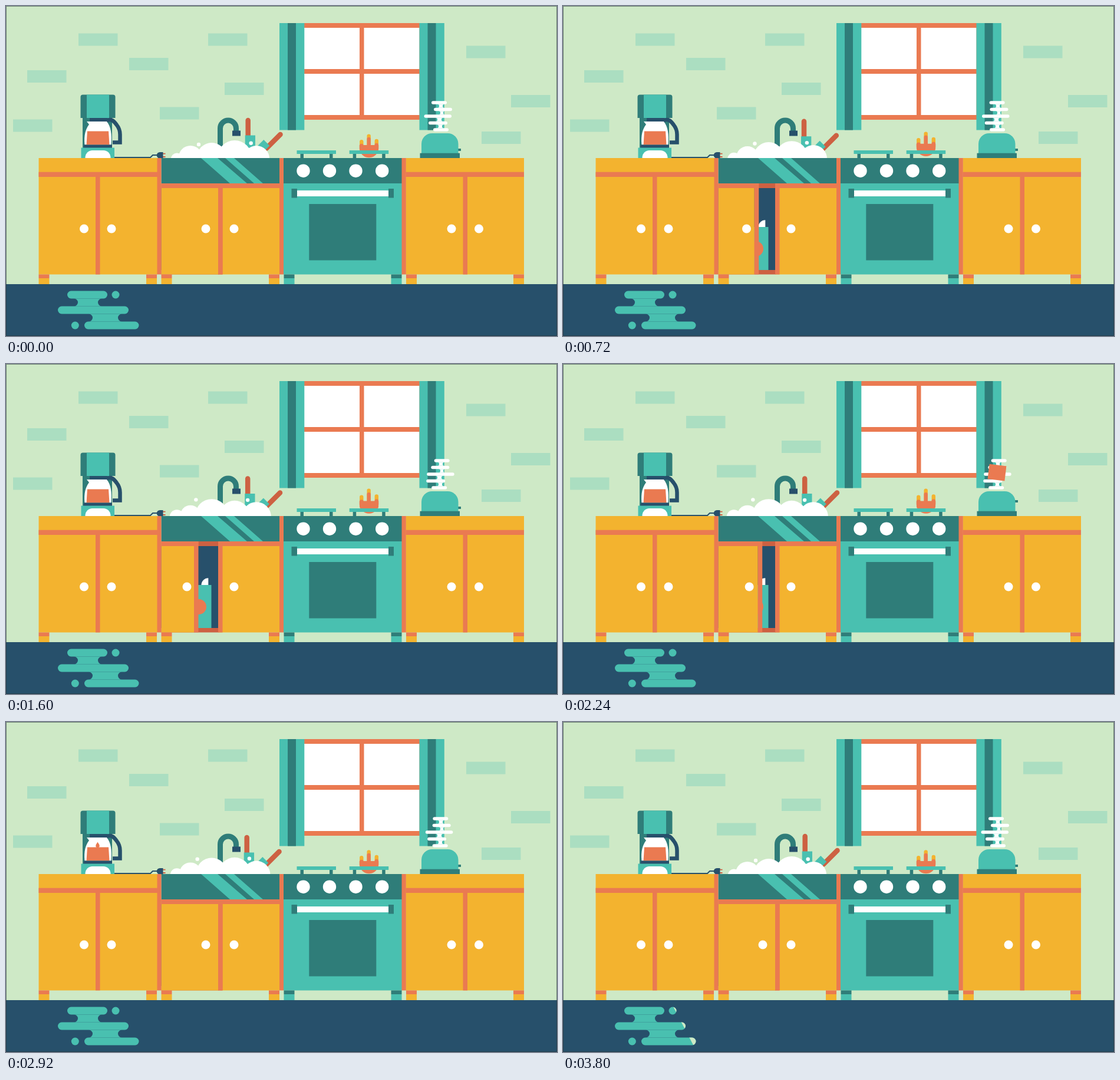
Recreate the animation shown at these times as an HTML page. Size 935 by 560 pixels, loop 3.84 s.

```html
<!DOCTYPE html>
<html lang="en">
<head>
<meta charset="utf-8">
<title>Kitchen</title>
<style>
  html, body { margin: 0; width: 100%; height: 100%; overflow: hidden; background: #cee9c6; }
  svg { display: block; width: 935px; height: 560px; }
</style>
</head>
<body>
<svg id="stage" viewBox="0 0 935 560" xmlns="http://www.w3.org/2000/svg"></svg>
<script>
const LOOP = 3840, STEP = 40;
const WALL = '#cee9c6', BRICK = '#abdec1', TEAL = '#49c0b0', DEEP = '#2f7d79', NAVY = '#27506b',
      ORANGE = '#ea7a51', RUST = '#cd6142', YELLOW = '#f3b32f', WHITE = '#fff';

// Shape helpers; rect takes left, top, right, bottom.
const rect = (x1, y1, x2, y2, fill, more = '') =>
  `<rect x="${x1}" y="${y1}" width="${x2 - x1}" height="${y2 - y1}" fill="${fill}" ${more}/>`;
const circle = (x, y, r, fill = WHITE, more = '') => `<circle cx="${x}" cy="${y}" r="${r}" fill="${fill}" ${more}/>`;
const path = (d, fill, more = '') => `<path d="${d}" fill="${fill}" ${more}/>`;
const line = (d, stroke, width, more = '') =>
  `<path d="${d}" fill="none" stroke="${stroke}" stroke-width="${width}" ${more}/>`;
const round = 'stroke-linecap="round"';
const pill = (x1, x2, y, r, fill, more = '') => rect(x1, y - r, x2, y + r, fill, `rx="${r}" ${more}`);
// Bridge between two pills with hollow round sides.
const bridge = (x1, x2, y, r) =>
  `M${x1} ${y - r}A${r} ${r} 0 0 1 ${x1} ${y + r}H${x2}A${r} ${r} 0 0 1 ${x2} ${y - r}Z`;

const bricks = [[123, 46.5], [209, 88], [36, 109], [343, 46.5], [371, 130], [261, 171.5],
                [12, 192.5], [781, 67.5], [857, 151], [807, 213]];
const steamRows = [[722, 748, 164, 5], [726, 757, 175.5, -5], [709.5, 756, 187, 5],
                   [717, 749, 198.5, -4], [725, 751, 210, -3]];
// x, y, radius, change of radius
const foamBumps = [[290, 259.5, 10, 2.5], [313, 257, 20, -3], [349, 257, 25, 3],
                   [388, 257, 29, -4], [425, 259, 22, 3]];
// x, tip, rise, inner tip
const tongues = [[603.3, 230.2, 6, 237], [615.7, 220.6, 8, 226], [628.8, 229, 6, 236]];

const windowFrame = () =>
  rect(506, 29, 702, 193, ORANGE) +
  [[506, 600], [607.5, 701.5]].map(([a, b]) => rect(a, 37, b, 107, WHITE) + rect(a, 115, b, 185, WHITE)).join('') +
  [464, 701.5].map(x => rect(x, 29, x + 42.3, 210.5, TEAL) + rect(x + 14, 29, x + 28, 210.5, DEEP)).join('');

const coffeeMaker = () =>
  rect(130, 188, 180, 241, DEEP) +
  path('M126.5 190V154.500a4 4 0 0 1 4-4H181.500a4 4 0 0 1 4 4V190Z', DEEP) +
  rect(137, 150.500, 175, 190, TEAL) +
  line('M170 195C178 190 183 195 188 202Q193.500 209 193.500 218V231.500H181', NAVY, 6.5) +
  path('M137 196H171C178 205 180 217 178.500 235.500H133.500C132 219 135 209 141 201Z', WHITE) +
  path('M138 212.500H174L175.500 235.500H136.500Z', ORANGE) +
  path('M0 -5.500C1 -3 3.200 -1.500 3.200 1A3.200 3.200 0 0 1 -3.200 1C-3.200 -1.500 -1 -3 0 -5.500Z', ORANGE, 'id="drop"') +
  rect(142, 190, 172, 196, NAVY) +
  rect(132, 235.500, 180, 241, NAVY) +
  rect(127.500, 240.500, 184, 259, TEAL) +
  path('M134.500 259V257A12 12 0 0 1 146.500 245H165.500A12 12 0 0 1 177.500 257V259Z', WHITE) +
  line('M184 257H245L249 253H258', NAVY, 2) +
  line('M265 250.700H270.500M265 256H270.500', RUST, 1.8) +
  path('M266.500 248V258.500H261A5 5 0 0 1 261 248Z', NAVY);

const sinkTop = () =>
  line('M363.500 258V207.500A13.500 13.500 0 0 1 390.500 207.500V213', DEEP, 9) +
  rect(384, 211.500, 398, 220.500, NAVY) +
  `<g id="tools">${
    line('M410.700 194V224', RUST, 8.5, round) + rect(405.700, 219.500, 423, 245, TEAL) +
    line('M465.500 218L442 241.500', RUST, 8.5, round) + line('M442.300 232L428 246.300', TEAL, 14)
  }</g>` +
  foamBumps.map(([x, y, r]) => circle(x, y, r, WHITE, 'class="bump"')).join('') +
  circle(327, 235, 3.2, WHITE, 'id="bubbleA"') + circle(415.700, 232.700, 3.2, WHITE, 'id="bubbleB"');

const burner = x =>
  rect(x, 245, x + 66.5, 251, TEAL) + rect(x + 6, 251, x + 11.5, 258.500, DEEP) + rect(x + 55.5, 251, x + 61, 258.500, DEEP);

const flame = () =>
  tongues.map(([x]) => line(`M${x} 240V240`, YELLOW, 6.4, `${round} class="tip"`)).join('') +
  tongues.map(([x]) => line(`M${x} 240V240`, ORANGE, 6.4, `${round} class="core"`)).join('') +
  path('M599.700 236H632.300V241A16.300 16.300 0 0 1 599.700 241Z', ORANGE, 'id="bowl"');

const toaster = () =>
  `<g>${steamRows.map(([a, b, y]) => pill(a, b, y, 2.75, WHITE, 'class="steam"')).join('')}${
    steamRows.slice(1).map(([, , y], i) => path(bridge([732, 734, 729, 731][i], [744, 745, 742, 743][i], y - 5.75, 3.1), WHITE)).join('')
  }</g>` +
  rect(-14.5, -12.7, 14.5, 12.7, ORANGE, 'id="toast"') +
  rect(765, 242, 772, 246, DEEP, 'id="lever"') +
  path('M705 251V234A18 18 0 0 1 723 216H749.500A18 18 0 0 1 767.500 234V251Z', TEAL) +
  rect(702.500, 249.700, 770, 258.500, DEEP);

const cabinet = (x1, x2, mid) =>
  rect(x1, 258, x2, 455.500, YELLOW) + rect(x1, 281.700, x2, 290, ORANGE) + rect(mid, 290, mid + 7.5, 455.500, ORANGE) +
  circle(mid - 19.500, 378, 7.5) + circle(mid + 27, 378, 7.5);

const sinkUnit = () =>
  rect(263.500, 258, 464, 301, DEEP) +
  path('M331 258H359L409 301H380ZM372 258H387L436 301H421Z', TEAL) +
  rect(263.500, 301, 361, 455.500, RUST) + rect(263.500, 309, 361, 448, NAVY) +
  rect(300, 375, 348.500, 448, TEAL) + path('M331.500 375A11.800 11.800 0 0 1 343.300 363.200V375Z', WHITE) +
  circle(327, 412, 13, ORANGE) +
  rect(360, 301, 464, 455.500, YELLOW) + rect(360, 301, 464, 309, ORANGE) + rect(360, 301, 367.500, 455.500, ORANGE) +
  circle(387, 378, 7.5) +
  `<g>${rect(263.500, 301, 360, 455.500, YELLOW, 'id="panel"') + rect(263.500, 301, 367.500, 309, ORANGE, 'id="rail"') +
        rect(360, 301, 367.500, 455.500, ORANGE, 'id="stile"') + circle(339, 378, 7.5, WHITE, 'id="knob"')}</g>`;

const stove = () =>
  rect(471, 258, 672, 301, DEEP) + rect(471, 301, 672, 455.500, TEAL) +
  [504.500, 549, 593.500, 638.200].map(x => circle(x, 279.700, 11.2)).join('') +
  rect(484.500, 310, 494, 325.500, DEEP) + rect(649, 310, 658, 325.500, DEEP) + rect(494, 313, 649, 323, WHITE) +
  rect(514.300, 336, 628.300, 431.500, DEEP);

const legs = () => [55.5, 238, 263.5, 446, 471.5, 653.5, 679, 861].map((x, i) => {
  const metal = i == 4 || i == 5;
  return rect(x, 455.500, x + 18, 462, metal ? DEEP : ORANGE) + rect(x, 462, x + 18, 472, metal ? TEAL : YELLOW);
}).join('');

const puddle = () => {
  const shape = pill(104, 172, 490, 6.5, TEAL) + pill(88, 208, 516, 6.5, TEAL) + pill(133, 225.500, 542, 6.5, TEAL) +
    circle(186, 490, 6.5, TEAL) + circle(117.300, 542, 6.5, TEAL) +
    path(bridge(115.5, 162.5, 503, 6.5), TEAL) + path(bridge(140.5, 196.5, 529, 6.5), TEAL);
  return `<clipPath id="pool">${shape}</clipPath>${shape}<g clip-path="url(#pool)">${
    path('M0 483H17L52 550H35Z', WALL, 'id="shine"')}</g>`;
};

const stage = document.getElementById('stage');
stage.innerHTML =
  rect(0, 0, 935, 560, WALL) + bricks.map(([x, y]) => rect(x, y, x + 66.5, y + 21, BRICK)).join('') +
  windowFrame() + coffeeMaker() + sinkTop() + flame() + burner(493.5) + burner(582.700) + toaster() +
  cabinet(55.5, 257, 152) + cabinet(678.500, 879, 775.500) + sinkUnit() + stove() +
  [[256.500, 263.500], [464, 471], [671.500, 678.800]].map(([a, b]) => rect(a, 258, b, 455.500, ORANGE)).join('') +
  // the plug lies in front of the counter edge
  legs() + rect(0, 472, 935, 560, NAVY) + puddle() +
  '<rect x=".5" y=".5" width="934" height="559" fill="none" stroke="#1e2c30" stroke-opacity=".55"/>';

const el = id => document.getElementById(id);
const all = name => [...stage.getElementsByClassName(name)];
const set = (node, attrs) => { for (const k in attrs) node.setAttribute(k, attrs[k]); };
const move = (id, x, y, more = '') => el(id).setAttribute('transform', `translate(${x} ${y}) ${more}`);

const steam = all('steam'), bumps = all('bump'), tips = all('tip'), cores = all('core');
const span = (t, start, length) => Math.min(1, Math.max(0, (t - start) / length));
const ease = u => u * u * (3 - 2 * u);
const sway = (t, period) => (1 - Math.cos(2 * Math.PI * t / period)) / 2;

function draw(t) {
  const slow = sway(t, LOOP), mid = sway(t, LOOP / 2), fast = sway(t, LOOP / 4);

  steam.forEach((s, i) => s.setAttribute('x', steamRows[i][0] + steamRows[i][3] * slow));
  bumps.forEach((b, i) => b.setAttribute('r', foamBumps[i][2] + foamBumps[i][3] * slow));
  move('bubbleA', -5 * slow, -5 * slow);
  move('bubbleB', -6 * slow, -2 * slow);
  move('tools', -2 * mid, 2 * mid);

  tongues.forEach(([x, tip, rise, inner], i) => {
    const up = rise * fast;
    tips[i].setAttribute('d', `M${x} 240V${tip - up}`);
    cores[i].setAttribute('d', `M${x} 242V${inner - up * .8}`);
  });
  move('bowl', 0, -4.7 * fast);

  const open = ease(span(t, 200, 680)) - ease(span(t, 2000, 680));
  const edge = 360 - 41 * open;
  el('panel').setAttribute('width', edge - 263.5);
  el('rail').setAttribute('width', edge - 256);
  el('stile').setAttribute('x', edge);
  el('knob').setAttribute('cx', 339 - 32 * open);

  const hop = span(t, 2041, 760), lift = 4 * hop * (1 - hop);
  move('toast', 736.5, 232 - 62 * lift, `rotate(${9.5 * Math.sin(Math.PI * hop)})`);
  move('lever', 0, -11 * (ease(span(t, 2060, 120)) - ease(span(t, 2820, 90))));

  const fall = span(t % 1920, 840, 360);
  const size = fall < 1 ? Math.min(1, fall * 4) : 0;
  move('drop', 155.5, 201 + 18 * fall, `scale(${size})`);

  move('shine', 123 + .2 * (t - 3480), 0);
}

const begin = performance.now();
function tick() {
  const t = (performance.now() - begin) % LOOP;
  draw(Math.floor(t / STEP) * STEP);
  requestAnimationFrame(tick);
}
tick();
</script>
</body>
</html>
```
